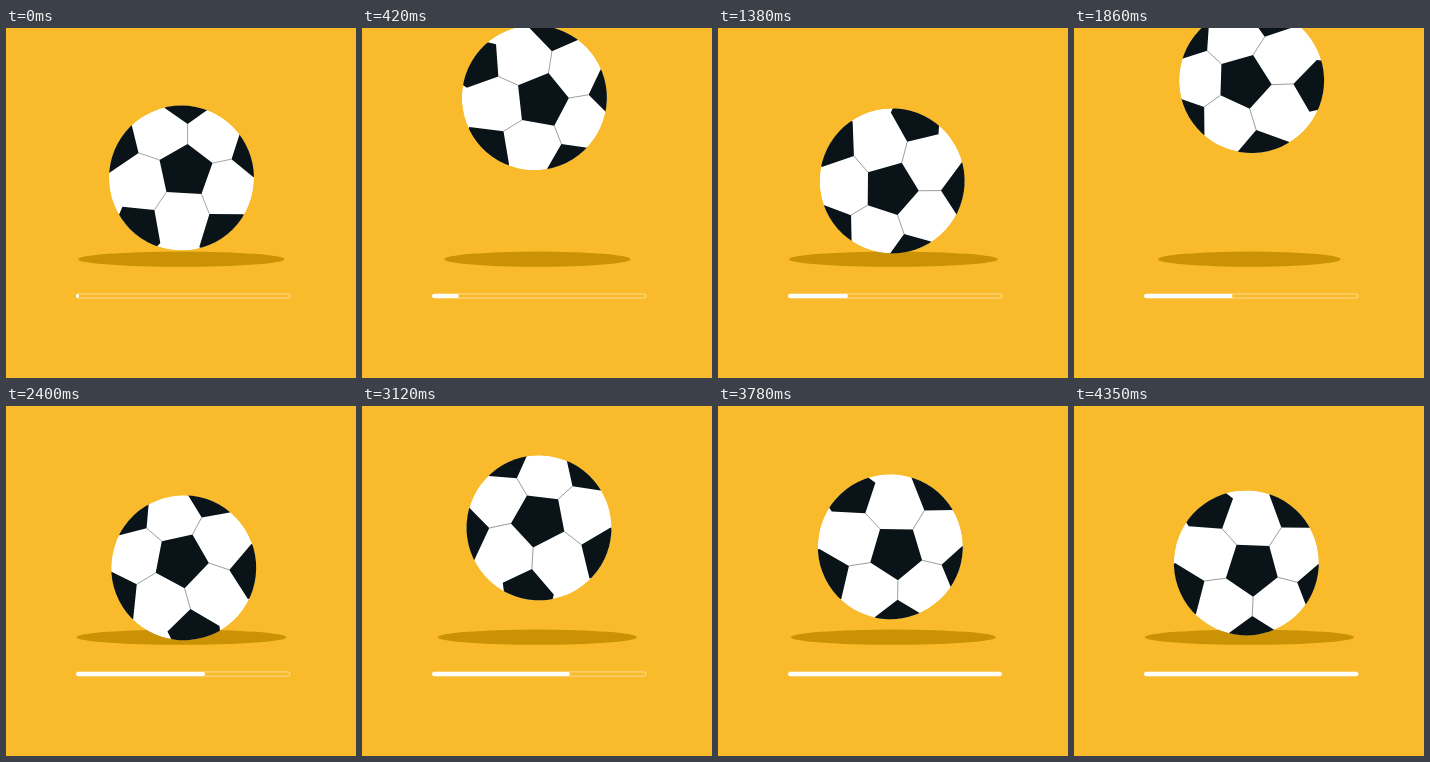
Recreate the animation shown at these times as an HTML page. Size 350x350 px, loop 4380 ms.

```html
<!DOCTYPE html>
<html lang="en">
<head>
<meta charset="utf-8">
<title>Bouncing ball loader</title>
<style>
  html, body { margin: 0; width: 100%; height: 100%; overflow: hidden; background: #f9bb2c; }
  svg { display: block; width: 100%; height: 100%; }
</style>
</head>
<body>
<svg viewBox="0 0 350 350">
  <defs>
    <clipPath id="round"><circle r="72.5"/></clipPath>
  </defs>
  <rect width="350" height="350" fill="#f9bb2c"/>
  <ellipse id="shadow" cx="175.4" cy="231.2" rx="103.5" ry="7.6" fill="#cb9206"/>
  <g id="ball">
    <g transform="translate(.2 3)" clip-path="url(#round)">
      <circle r="72.5" fill="#fff"/>
      <path fill="none" stroke="#8c8f90" stroke-width=".8"
        d="M6-34V-54M31-15L50-19M20 16L28 36M-15 14L-27 32M-22-18L-43-25"/>
      <path fill="#0a1418"
        d="M6-34L31-15 20 16-15 14-22-18Z
           M-17-70L6-54 27-69 20-90-10-90Z
           M58-44L50-19 72-1 95-10 85-45Z
           M18 69L28 36 62 36 72 60 40 85Z
           M-59 29L-27 32-21 65-40 85-70 55Z
           M-50-53L-43-25-72-5-95-20-80-50Z"/>
    </g>
  </g>
  <rect x="70.5" y="265.9" width="213.6" height="4.2" rx="2.1" fill="none" stroke="#fff" stroke-opacity=".6" stroke-width=".8"/>
  <rect id="fill" x="70" y="265.9" width="3" height="4.2" rx="2.1" fill="#fff"/>
</svg>
<script>
  const LOOP = 4380, STEP = 30, BOUNCE = 1500, LEAD = 210, GROUND = 160;
  const get = id => document.getElementById(id);
  const ball = get('ball'), shadow = get('shadow'), fill = get('fill');

  // Angle and bar width at rest after each bounce
  const angles = [0, 161, 310.5, 464.5], widths = [3, 60, 129, 214.5];

  // Take-off, big arc, then one low hop: start, height, ease
  const arc = [
    [0, GROUND, u => u ** 1.3],
    [210, 147, u => u ** 1.1],
    [575, 53, u => u ** 1.6],
    [755, GROUND, u => u * (2 - u)],
    [915, 135.5, u => u * u],
    [1070, GROUND]
  ];

  const ratio = (t, from, to) => Math.min(1, Math.max(0, (t - from) / (to - from)));
  const smooth = u => u * u * (3 - 2 * u);
  const mix = (a, b, u) => a + (b - a) * u;

  function heightAt(s) {
    const next = arc.findIndex(([start]) => start > s);
    if (next < 0) return GROUND;
    const [t0, y0, ease] = arc[next - 1], [t1, y1] = arc[next];
    return mix(y0, y1, ease(ratio(s, t0, t1)));
  }

  // Advances on the way up, pauses at the top, then finishes on the way down
  function advance(stops, n, s, share) {
    const up = smooth(ratio(s, 200, 600)), down = smooth(ratio(s, 650, 1020));
    return mix(stops[n], stops[n + 1] ?? stops[n], mix(down, up, share));
  }

  function draw(now) {
    let t = Math.floor(now % LOOP / STEP) * STEP;
    if (t < 2 * STEP) t = 0;
    const n = Math.floor((t + LEAD) / BOUNCE), s = (t + LEAD) % BOUNCE;
    const y = heightAt(s);
    ball.setAttribute('transform', `translate(175.3 ${y}) rotate(${advance(angles, n, s, 0.5)})`);
    shadow.setAttribute('rx', 105 - 0.13 * (GROUND - y));
    fill.setAttribute('width', advance(widths, n, s, 0.42));
  }

  const start = performance.now();
  function tick() {
    draw(performance.now() - start);
    requestAnimationFrame(tick);
  }
  tick();
</script>
</body>
</html>
```
